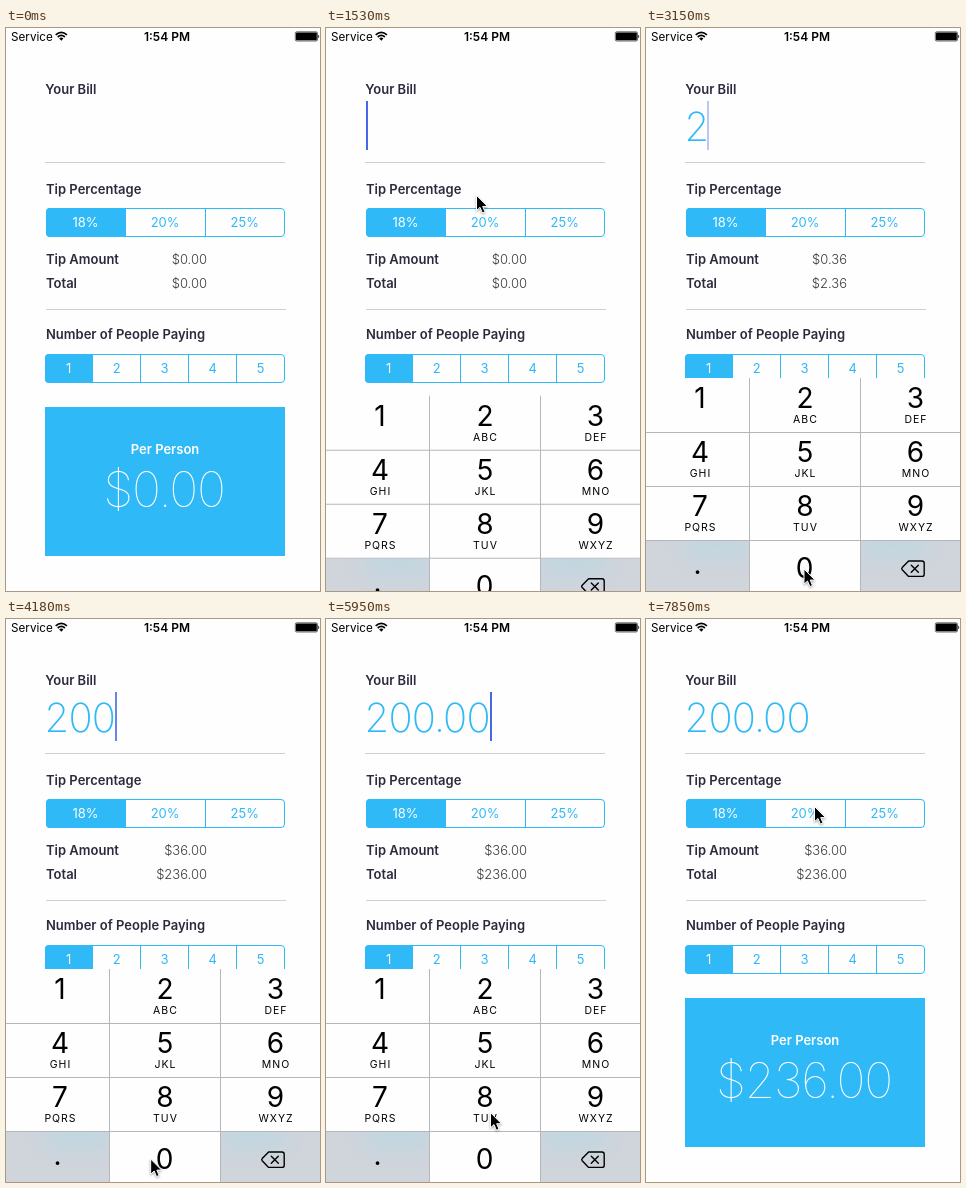
Recreate the animation shown at these times as an HTML page. Size 314x563 px, loop 8 s.

```html
<!DOCTYPE html>
<html lang="en">
<head>
<meta charset="utf-8">
<title>Tip calculator</title>
<style>
  html, body { margin: 0; width: 100%; height: 100%; overflow: hidden; background: #fefefe; }
  svg { display: block; width: 314px; height: 563px; font-family: Inter, "Open Sans", sans-serif; }
  text { white-space: pre; }
  .label { font-size: 13px; font-weight: 600; fill: #2b2b3d; }
  .amount { font-size: 13px; font-weight: 300; fill: #38383f; text-anchor: end; }
  .segment { font-size: 13px; text-anchor: middle; }
  .bill { font-size: 40px; font-weight: 150; fill: #2fb9f6; letter-spacing: -.022em; }
  .share { font-size: 49px; font-weight: 140; fill: #fff; letter-spacing: -.026em; text-anchor: middle; }
  .digit { font-size: 28px; text-anchor: middle; }
  .letters { font-size: 10.5px; letter-spacing: 1px; text-anchor: middle; }
  .pointer { filter: drop-shadow(0 1px 1px rgba(0, 0, 0, .35)); }
</style>
</head>
<body>
<svg id="stage" viewBox="0 0 314 563"></svg>
<script>
const LOOP = 8000;
const BLUE = '#2fb9f6';
const TIP_RATE = 0.18;
const stage = document.getElementById('stage');

function add(parent, tag, attrs = {}, content = '') {
  const node = document.createElementNS('http://www.w3.org/2000/svg', tag);
  for (const key in attrs) node.setAttribute(key, attrs[key]);
  node.textContent = content;
  return parent.appendChild(node);
}
const rect = (parent, x, y, width, height, fill, more = {}) =>
  add(parent, 'rect', { x, y, width, height, fill, ...more });
const text = (parent, cls, x, y, content, more = {}) =>
  add(parent, 'text', { class: cls, x, y, ...more }, content);

function segments(x, y, width, labels) {
  const cell = width / labels.length;
  const edge = i => Math.ceil(x + i * cell);
  add(stage, 'path', {
    d: `M${edge(1)} ${y}H${x + 4}q-4 0-4 4v21q0 4 4 4H${edge(1)}Z`, fill: BLUE
  });
  rect(stage, x + .5, y + .5, width - 1, 28, 'none', { rx: 3.5, stroke: BLUE });
  labels.forEach((label, i) => {
    if (i > 1) rect(stage, edge(i) - 1, y, 1, 29, BLUE);
    text(stage, 'segment', x + cell * (i + .5) - .4, y + 19, label, { fill: i ? BLUE : '#fff' });
  });
}

function statusBar() {
  text(stage, '', 5, 12.5, 'Service', { 'font-size': 11.7 });
  text(stage, '', 161, 12.5, '1:54 PM', { 'font-size': 12, 'font-weight': 600, 'text-anchor': 'middle' });
  add(stage, 'path', {
    d: 'M49.7 6.9Q55.3 1.9 60.9 6.9M51.7 9Q55.3 5.8 58.9 9',
    fill: 'none', stroke: '#000', 'stroke-width': 1.7
  });
  add(stage, 'path', { d: 'M53.2 10.4Q55.3 8.8 57.4 10.4L55.3 12.7Z' });
  rect(stage, 289.3, 3.8, 22.2, 9.2, 'none', { rx: 1.5, stroke: '#000', 'stroke-width': .6 });
  rect(stage, 290, 4.5, 20.8, 7.8, '#000', { rx: .8 });
  add(stage, 'path', { d: 'M312.3 6.6q1.8 1.8 0 3.6Z' });
}

function form() {
  text(stage, 'label', 39.3, 66, 'Your Bill');
  rect(stage, 39, 134, 240, 1, '#cfcfdb');
  text(stage, 'label', 40, 166, 'Tip Percentage');
  segments(40, 180, 239, ['18%', '20%', '25%']);
  text(stage, 'label', 40, 236, 'Tip Amount');
  text(stage, 'label', 40, 260, 'Total');
  rect(stage, 40, 281, 240, 1, '#cfcfdb');
  text(stage, 'label', 40, 311, 'Number of People Paying');
  segments(39, 326, 240, ['1', '2', '3', '4', '5']);
  rect(stage, 39, 379, 240, 149, BLUE);
  text(stage, 'label', 159, 426, 'Per Person', { 'text-anchor': 'middle', style: 'fill:#fff' });
}

// Returns the keypad group and the highlights of the keys that get pressed.
function keypad() {
  const pad = add(stage, 'g');
  const columns = [54, 159, 269.5];
  const letters = ['', 'ABC', 'DEF', 'GHI', 'JKL', 'MNO', 'PQRS', 'TUV', 'WXYZ'];
  rect(pad, 0, 350, 314, 216, '#fefefe');
  const blur = add(add(stage, 'defs'), 'filter', { id: 'soft', x: '-60%', y: '-150%', width: '220%', height: '400%' });
  add(blur, 'feGaussianBlur', { stdDeviation: 11 });
  for (const [x, width, tintX] of [[0, 103, 39], [215, 99, 215]]) {
    const cell = add(pad, 'svg', { x, y: 513, width, height: 53 });
    rect(cell, 0, 0, width, 53, '#d0d4db');
    rect(cell, tintX - x, -10, 64, 26, '#bfd7e1', { filter: 'url(#soft)' });
  }
  const keys = {
    2: rect(pad, 104, 350, 110, 54, '#d0d4db'),
    0: rect(pad, 104, 513, 110, 53, '#d0d4db'),
    '.': rect(pad, 0, 513, 103, 53, '#fefefe')
  };
  for (const y of [404, 458, 512]) rect(pad, 0, y, 314, 1, '#b5b6ba');
  for (const x of [103, 214]) rect(pad, x, 350, 1, 216, '#b5b6ba');
  letters.forEach((group, i) => {
    const x = columns[i % 3], y = 380 + 54 * Math.floor(i / 3);
    text(pad, 'digit', x, y, i + 1);
    text(pad, 'letters', x + .5, y + 15, group);
  });
  text(pad, 'digit', 51.5, 546, '.');
  text(pad, 'digit', 158.5, 550, '0');
  add(pad, 'path', {
    d: 'M262.6 533H276q2.2 0 2.2 2.2v11q0 2.2-2.2 2.2H262.6L256.2 541.8q-1-1.1 0-2.2ZM265.3 537.2l7 7m0-7l-7 7',
    fill: 'none', stroke: '#000', 'stroke-width': 1.4, 'stroke-linejoin': 'round', 'stroke-linecap': 'round'
  });
  return { pad, keys };
}

statusBar();
form();
const bill = text(stage, 'bill', 38.6, 112.5, '');
const caret = rect(stage, 0, 73, 2, 49, '#4668e6');
const tip = text(stage, 'amount', 201, 236, '');
const total = text(stage, 'amount', 201, 260, '');
const share = text(stage, 'share', 158, 479, '');
const { pad, keys } = keypad();
const pointer = add(stage, 'path', {
  class: 'pointer',
  d: 'M0 0V15.2L3.5 12 5.9 17.6 8.5 16.5 6.2 11.1H11Z',
  fill: '#000', stroke: '#fff', 'stroke-width': 1, 'stroke-linejoin': 'round'
});

// Each press: time, key, time held.
const presses = [
  [2420, '2', 130], [3300, '0', 130], [3590, '0', 130],
  [4480, '.', 130], [5350, '0', 110], [5500, '0', 110]
];
// Pointer stops: time, x, y.
const stops = [
  [500, 195, 174], [950, 150, 104], [1240, 150, 104], [1530, 150.5, 167],
  [2130, 156, 376], [2570, 156, 376], [3120, 158, 541], [4080, 158, 541],
  [4180, 145, 540], [4450, 48, 541], [4640, 48, 541], [4920, 149, 540],
  [5800, 148, 540], [6780, 255, 239], [7560, 255, 239], [7840, 168.5, 187.5]
];
const FOCUS = 1220, BLUR = 7090;

const clamp = v => Math.min(1, Math.max(0, v));
const easeOut = (t, start, length) => 1 - (1 - clamp((t - start) / length)) ** 3;
const money = v => '$' + v.toFixed(2);

function pointerAt(t) {
  const next = stops.findIndex(stop => stop[0] > t);
  if (next < 0) return stops[stops.length - 1].slice(1);
  const [t0, x0, y0] = stops[Math.max(0, next - 1)], [t1, x1, y1] = stops[next];
  const p = clamp((t - t0) / (t1 - t0));
  return [x0 + (x1 - x0) * p, y0 + (y1 - y0) * p];
}

// The caret stays solid after a key, then fades out and in again.
function caretOpacity(age) {
  const phase = age % 1150;
  return phase < 1000 ? 1 - clamp((phase - 530) / 320) : (phase - 1000) / 150;
}

function caretX(typed) {
  const dot = typed.includes('.');
  const digits = typed.length - dot;
  return digits ? Math.round(37.8 + 23.6 * digits + (dot ? 8.5 : 0)) : 40;
}

function draw(t) {
  const done = presses.filter(press => press[0] <= t);
  const typed = done.map(press => press[1]).join('');
  const value = Number(typed);
  const last = done.length ? done[done.length - 1] : [FOCUS, '', 0];

  bill.textContent = typed;
  tip.textContent = money(value * TIP_RATE);
  total.textContent = share.textContent = money(value * (1 + TIP_RATE));

  caret.setAttribute('x', caretX(typed));
  caret.setAttribute('opacity', t >= FOCUS && t < BLUR ? caretOpacity(t - last[0]) : 0);

  for (const key in keys) {
    keys[key].setAttribute('opacity', last[1] === key && t - last[0] < last[2] ? 1 : 0);
  }
  const raised = easeOut(t, FOCUS, 550) - easeOut(t, BLUR, 380);
  pad.setAttribute('transform', `translate(0 ${216 * (1 - raised)})`);

  pointer.setAttribute('visibility', t < 500 ? 'hidden' : 'visible');
  pointer.setAttribute('transform', `translate(${pointerAt(t)})`);
}

const begin = performance.now();
function tick() {
  draw((performance.now() - begin) % LOOP);
  requestAnimationFrame(tick);
}
tick();
</script>
</body>
</html>
```
